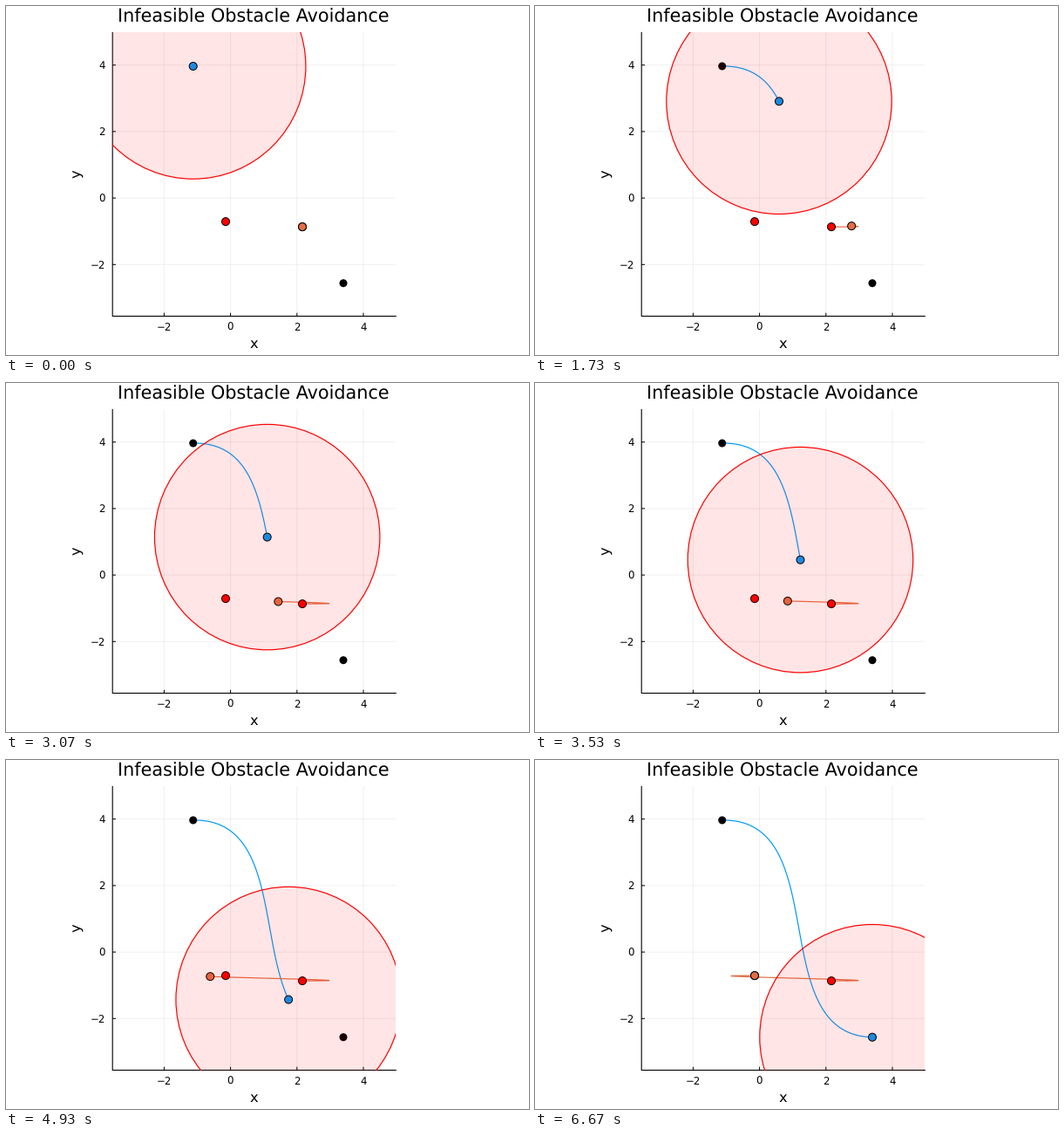
Write a matplotlib script that moves like this. It is 600x400 px and loops after 6740 ms.

```python
import numpy as np
import matplotlib.pyplot as plt
from matplotlib.animation import FuncAnimation
from matplotlib.patches import Circle

PT = 0.72                      # points per pixel at 100 dpi
W, H = 600, 400
LEFT, RIGHT, TOP, BOTTOM = 122.2, 447.3, 30.4, 355.5
X0, Y0, UNIT = 257.6, 220.1, 38.1
RADIUS = 129.2
STEPS, FPS = 100, 15           # the motion advances 15 times a second
LOOP, INTERVAL = 6740, 20
DRIFT = np.array([381.0, 0.0])  # both agents start and end moving right
BLUE, ORANGE, RED = "#009afa", "#e26f46", "#ff0000"

BLUE_ENDS = np.array([[214.7, 69.0], [387.0, 317.7]])
ORANGE_ENDS = np.array([[340.0, 253.1], [252.0, 247.1]])

plt.rcParams.update({"font.family": "DejaVu Sans", "text.hinting": "none"})


def path(ends, k):
    """Positions after k Euler steps of a quadratic velocity profile."""
    k = np.asarray(k, float)[..., None]
    n = STEPS
    ease = k * (k - 1) * (3 * n + 1 - 2 * k) / (n * (n * n - 1))
    start, goal = ends
    return start + DRIFT * k / n + (goal - start - DRIFT) * ease


fig = plt.figure(figsize=(6, 4), dpi=100, facecolor="white")
ax = fig.add_axes([LEFT / W, 1 - BOTTOM / H, (RIGHT - LEFT) / W, (BOTTOM - TOP) / H])
ax.set_xlim(LEFT, RIGHT)
ax.set_ylim(BOTTOM, TOP)
ax.axis("off")


def stroke(xs, ys, color="black", width=1.0, **kw):
    return ax.plot(xs, ys, color=color, lw=width * PT, snap=False, **kw)[0]


def disc(center, radius, fill, z, edge="black", width=1.0):
    return ax.add_patch(Circle(center, radius, fc=fill, ec=edge,
                               lw=width * PT, zorder=z))


def label(x, y, text, size, ha="center", **kw):
    ax.text(x, y, text, fontsize=size * PT, ha=ha, va="baseline", **kw)


# Grid, ticks and frame
for v in (-2, 0, 2, 4):
    x, y = X0 + v * UNIT, Y0 - v * UNIT
    name = str(v).replace("-", "\u2212")
    stroke([x, x], [TOP, BOTTOM], alpha=0.06, zorder=0)
    stroke([LEFT, RIGHT], [y, y], alpha=0.06, zorder=0)
    stroke([x, x], [BOTTOM - 3.3, BOTTOM], zorder=1)
    stroke([LEFT, LEFT + 3.3], [y, y], zorder=1)
    label(x - 0.3, 371.9, name, 11.8)
    label(113.8, y + 4.4, name, 11.8, ha="right")
stroke([LEFT, LEFT, RIGHT], [TOP, BOTTOM, BOTTOM], width=1.1, zorder=1, clip_on=False)

label(284, 18.3, "Infeasible Obstacle Avoidance", 20.75)
label(284.6, 391.5, "x", 16.2)
label(85.7, 192.1, "y", 16.2, rotation=90, rotation_mode="anchor")

# Trails, end points, moving agents and the keep-out zone
agents = []
for ends, color, end_color, edge in ((BLUE_ENDS, BLUE, "black", 0),
                                     (ORANGE_ENDS, ORANGE, RED, 1)):
    trail = stroke([], [], color, 1.2, zorder=2)
    for p in ends:
        disc(p, 4.5, end_color, 3, width=edge)
    agents.append((ends, trail, disc(ends[0], 4.5, color, 4)))
zone = disc(BLUE_ENDS[0], RADIUS, (1, 0, 0, 0.1), 5, edge=RED, width=1.2)


def update(i):
    t = i * INTERVAL + INTERVAL / 2
    k = min(STEPS, int((t + 5) * FPS / 1000))
    for ends, trail, mark in agents:
        points = path(ends, np.arange(k + 1))
        trail.set_data(points[:, 0], points[:, 1])
        mark.center = points[-1]
    zone.center = path(BLUE_ENDS, k)
    return [zone]


anim = FuncAnimation(fig, update, frames=LOOP // INTERVAL, interval=INTERVAL,
                     init_func=lambda: update(0), repeat=True, repeat_delay=0)
plt.show()
```
